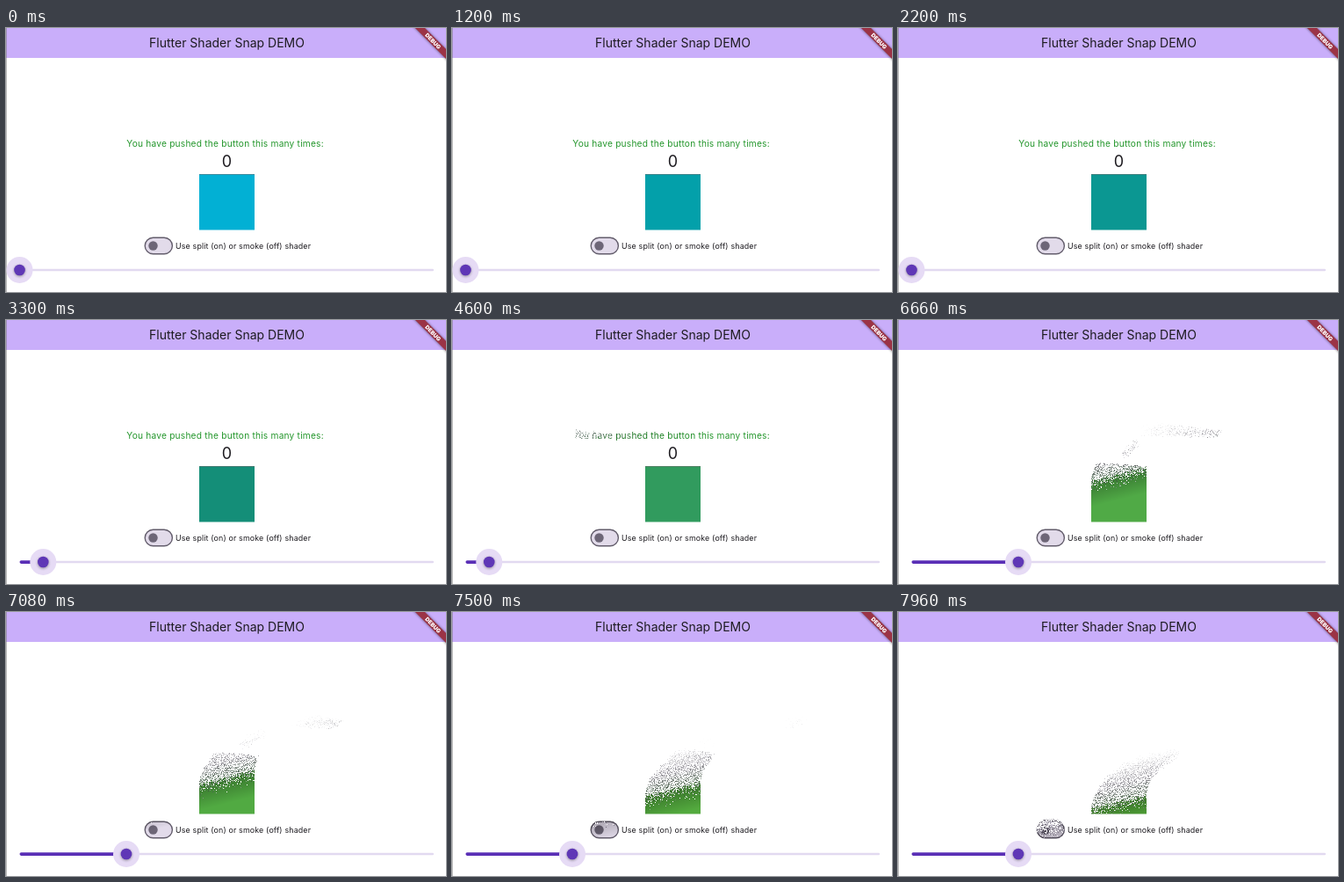
Recreate the animation shown at these times as an HTML page with a canvas. Size 501 px wide and 300 px high, loop 8 s.

```html
<!DOCTYPE html>
<html lang="en">
<head>
<meta charset="utf-8">
<title>Shader snap demo</title>
<style>
  html, body { margin: 0; width: 100%; height: 100%; overflow: hidden; background: #fff; }
  svg { position: absolute; left: 0; top: 0; }
  canvas { position: absolute; left: 130px; top: 110px; }
  text { font-family: Inter, sans-serif; fill: #1d1b20; }
</style>
</head>
<body>
<svg width="501" height="300" viewBox="0 0 501 300">
  <defs>
    <filter id="soft" x="-50%" y="-50%" width="200%" height="200%"><feGaussianBlur stdDeviation="1.6"/></filter>
  </defs>
  <rect width="501" height="34" fill="#c9aefa"/>
  <rect width="1" height="300" fill="#777" opacity=".5"/>
  <text x="251.5" y="21.6" font-size="14" text-anchor="middle">Flutter Shader Snap DEMO</text>

  <g transform="translate(501 0) rotate(45)">
    <rect x="-28" y="17" width="56" height="8" opacity=".5" filter="url(#soft)"/>
    <rect x="-28" y="17" width="56" height="7.8" fill="#9b3346"/>
    <text y="23.3" font-size="6.4" font-weight="900" text-anchor="middle" style="fill:#fff">DEBUG</text>
  </g>

  <text x="193" y="250.7" font-size="8.9" letter-spacing=".15">Use split (on) or smoke (off) shader</text>

  <rect x="16" y="273.8" width="471" height="2.5" rx="1.2" fill="#e2d9f0"/>
  <rect id="active" x="15.5" y="273.3" height="3.6" rx="1.8" fill="#5a2fb6"/>
  <g id="thumb">
    <circle r="15" fill="#e6dbf5"/>
    <circle cy="1" r="6.4" opacity=".35" filter="url(#soft)"/>
    <circle r="6.3" fill="#5f37b6"/>
  </g>
</svg>
<canvas id="smoke" width="290" height="150"></canvas>

<script>
const LOOP = 8000, X0 = 130, Y0 = 110, W = 290, H = 150;
const out = document.getElementById('smoke').getContext('2d');
const layer = Object.assign(document.createElement('canvas'), { width: W, height: H });
const src = layer.getContext('2d', { willReadFrequently: true });
const active = document.getElementById('active');
const thumb = document.getElementById('thumb');

// [time, values...]
const TINT = [[0, 2, 176, 212], [1200, 3, 160, 170], [3300, 20, 142, 120],
              [5580, 70, 165, 75], [6660, 80, 170, 70], [8000, 84, 170, 58]];
const SLIDE = [[0, 15.5], [2780, 15.5], [3200, 42.3], [5260, 42.3], [5540, 137], [8000, 137]];

const clamp = v => Math.max(0, Math.min(1, v));

function sample(keys, t) {
  let i = 1;
  while (i < keys.length - 1 && keys[i][0] < t) i++;
  const a = keys[i - 1], b = keys[i], k = clamp((t - a[0]) / (b[0] - a[0]));
  return a.slice(1).map((v, n) => v + (b[n + 1] - v) * k);
}

function noise(seed) {
  return Float32Array.from({ length: W * H }, () => {
    seed = (seed + 0x6D2B79F5) | 0;
    let h = Math.imul(seed ^ (seed >>> 15), seed | 1);
    h ^= h + Math.imul(h ^ (h >>> 7), h | 61);
    return ((h ^ (h >>> 14)) >>> 0) / 4294967296;
  });
}
const onset = noise(11), shade = noise(29), drift = noise(53), lift = noise(97);

function paintWidgets(t) {
  src.setTransform(1, 0, 0, 1, -X0, -Y0);
  src.clearRect(X0, Y0, W, H);

  src.textAlign = 'left';
  src.letterSpacing = '0.2px';
  src.font = '10.2px Inter, sans-serif';
  src.fillStyle = '#23962b';
  src.fillText('You have pushed the button this many times:', 137.3, 135);

  src.textAlign = 'center';
  src.letterSpacing = '0px';
  src.font = '18px Inter, sans-serif';
  src.fillStyle = '#1d1b20';
  src.fillText('0', 251.5, 157.5);

  src.fillStyle = `rgb(${sample(TINT, t).map(Math.round)})`;
  src.fillRect(220, 166, 63, 63.5);
  src.fillStyle = 'rgba(110,100,105,.5)';
  src.fillRect(220, 166, 63, 1);

  src.beginPath();
  src.roundRect(158.2, 238.2, 31.2, 18.6, 9.3);
  src.fillStyle = '#e2dbea';
  src.fill();
  src.lineWidth = 1.4;
  src.strokeStyle = '#635d6c';
  src.stroke();
  src.beginPath();
  src.arc(167.5, 247.5, 5.2, 0, Math.PI * 2);
  src.fillStyle = '#6d6677';
  src.fill();
}

// The dissolve sweeps down and to the right; each pixel turns to grain, then drifts off.
function dissolve(t) {
  const from = src.getImageData(0, 0, W, H).data;
  const image = out.createImageData(W, H), to = image.data;

  const put = (x, y, r, g, b, a) => {
    if (x < 0 || y < 0 || x >= W || y >= H) return;
    const o = (y * W + x) * 4;
    if (to[o + 3] > a) return;
    to[o] = r; to[o + 1] = g; to[o + 2] = b; to[o + 3] = a;
  };

  for (let y = 0; y < H; y++) {
    for (let x = 0; x < W; x++) {
      const i = y * W + x, o = i * 4, a = from[o + 3];
      if (!a) continue;
      const early = y + Y0 > 233 ? 300 : 0;
      const age = t + early - (32 * (y + Y0) + 8 * (x + X0) - 972);
      const r = from[o], g = from[o + 1], b = from[o + 2];

      if (onset[i] >= clamp((age + 700) / 800) ** 3) {
        const dim = 1 - 0.3 * clamp((age + 900) / 900);
        put(x, y, r * dim, g * dim, b * dim, a);
        continue;
      }
      // Solid areas leave gaps between the grains, thin strokes do not.
      if (shade[i] < 0.42 && a === 255) continue;
      const q = Math.max(age, 0);
      const alpha = a * clamp(1.05 - q / 1450);
      if (alpha < 4) continue;
      const v = 55 + 155 * drift[i], mix = 0.3 * clamp(1 - q / 600);
      const px = x + 1.9e-5 * q * q * (0.8 + 0.4 * shade[i]);
      const py = y - 0.006 * q * (0.3 + 1.1 * lift[i]);
      put(Math.round(px), Math.round(py),
        v + (r - v) * mix, v - 3 + (g - v) * mix, v + 6 + (b - v) * mix, alpha);
    }
  }
  out.putImageData(image, 0, 0);
}

const start = performance.now();
function frame() {
  const t = (performance.now() - start) % LOOP;
  const [x] = sample(SLIDE, t);
  active.setAttribute('width', x - 15.5);
  thumb.setAttribute('transform', `translate(${x} 275)`);
  paintWidgets(t);
  dissolve(t);
  requestAnimationFrame(frame);
}
frame();
</script>
</body>
</html>
```
